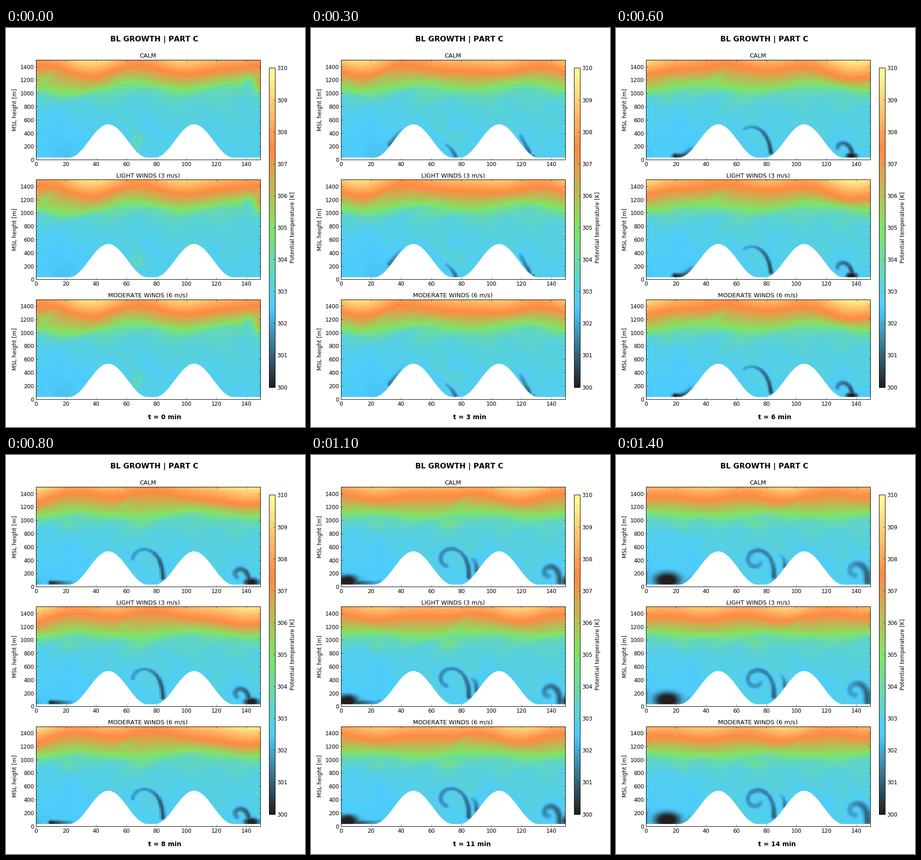
A matplotlib script that plays this animation: 648 px wide and 864 px high, repeating every 1500 ms.

```python
import numpy as np
import matplotlib.pyplot as plt
from matplotlib.animation import FuncAnimation
from matplotlib.colors import LinearSegmentedColormap

plt.rcParams.update({
    "figure.dpi": 72, "font.family": "DejaVu Sans", "font.size": 12,
    "text.kerning_factor": 6,
    "axes.linewidth": 1, "axes.axisbelow": False,
    "xtick.direction": "in", "ytick.direction": "in",
    "xtick.top": True, "ytick.right": True,
    "xtick.major.size": 4, "ytick.major.size": 4,
    "xtick.major.width": 0.5, "ytick.major.width": 0.5,
    "xtick.major.pad": 4, "ytick.major.pad": 4,
})

FRAMES, STEP_MS = 15, 100
WIDTH, TOP = 149, 1500
NX, NZ = 149, 100
Z_UNIT = 22  # metres of height drawn as long as one horizontal grid point

HEAT = LinearSegmentedColormap.from_list(
    "heat", ["#221f1f", "#4dccff", "#80e466", "#ff8a42", "#ffff99"], N=256)

X, Z = np.meshgrid((np.arange(NX) + 0.5) * WIDTH / NX,
                   (np.arange(NZ) + 0.5) * TOP / NZ)


def wrap(dx):
    """Shortest horizontal distance in the periodic domain."""
    return (dx + WIDTH / 2) % WIDTH - WIDTH / 2


def ramp(t, start, end):
    return np.clip((t - start) / (end - start), 0, 1)


def terrain(x):
    z = np.full_like(x, 35, dtype=float)
    for centre in (48, 105):
        d = np.clip((x - centre) / 26, -1, 1)
        z += 500 * np.cos(d * np.pi / 2) ** 2
    return z


def wave(x, count, degrees):
    return np.cos(2 * np.pi * count * x / WIDTH - np.radians(degrees))


def inversion(x, t):
    """Heights of the 305 K and 307.5 K surfaces: waves travelling along them."""
    green = (1085 + 66 * np.exp(-t / 14) * wave(x, 2, 300 - 20 * t)
             + 28 * np.exp(-t / 6) * wave(x, 1, 240))
    orange = (1340 + 62 * np.exp(-t / 15) * wave(x, 2, 340 - 30 * t)
              + (20 - 90 * np.sin(np.pi * t / 14) ** 2) * wave(x, 1, -28)
              + 28 * wave(x, 3, 110 + 53 * t))
    return green, orange


def eddies(t):
    """Faint folded streaks drifting with the flow."""
    rng = np.random.default_rng(4)
    wx = X - 1.5 * t + 5 * np.sin(Z / 140 + X / 21 + t * 0.15)
    wz = Z + 90 * np.sin(X / 9 - t * 0.2)
    total = 0
    for _ in range(6):
        kx, kz, phase = rng.uniform([.07, -.009, 0], [.32, .009, 6.3])
        total = total + np.sin(kx * wx + kz * wz + phase)
    return total / 6


def puff(x, z, rx, rz):
    return np.exp(-(wrap(X - x) / rx) ** 2 - ((Z - z) / rz) ** 2)


def cooling(x, z, strength, width):
    """Cooling around a polyline whose strength varies along its length."""
    best = np.zeros_like(X)
    for i in range(len(x) - 1):
        dx, dz = x[i + 1] - x[i], (z[i + 1] - z[i]) / Z_UNIT
        px, pz = wrap(X - x[i]), (Z - z[i]) / Z_UNIT
        f = np.clip((px * dx + pz * dz) / (dx * dx + dz * dz + 1e-9), 0, 1)
        dist2 = (px - f * dx) ** 2 + (pz - f * dz) ** 2
        level = strength[i] + f * (strength[i + 1] - strength[i])
        best = np.maximum(best, level * np.exp(-dist2 / width ** 2))
    return best


def roll(t, foot, length, turn, strength, width):
    """Cold plume rising from the ground and curling over to the left."""
    s = np.linspace(0, 1, 24)
    lean = 90 + 28 * np.exp(-max(t - 4, 0) / 2)
    heading = np.radians(lean + turn * s ** 2)
    step = length / len(s)
    x = foot + np.cumsum(np.cos(heading)) * step
    z = terrain(foot) + 10 + np.cumsum(np.sin(heading)) * step * Z_UNIT
    return cooling(x, z, strength * (1 - 0.5 * s), width)


def cold_air(t):
    late = max(t - 4, 0)
    onset = ramp(t, 0.5, 4)

    valley = roll(t, 85 - 5 * np.exp((4 - t) / 1.8),
                  52 * (1 - np.exp(-max(t - 2, 0.5) / 4.7)), 27 * max(t - 2, 0),
                  onset * 2.4 - 0.05 * late, 1.5 + 0.04 * late)
    right = roll(t, 149 - 18.5 * np.exp((4 - t) / 4.3),
                 15 + 1.4 * (t - 4), 260 * (1 - np.exp(-late / 2)),
                 onset * 2.5 - 0.06 * late, 1.5 + 0.12 * late)
    young = roll(t, 90 + 0.7 * (t - 11), 9, 60, 1.6 * ramp(t, 8, 11), 1.8)

    # Pool sliding right along the valley floor and in again on the left
    u = wrap(X - 130 - 3.3 * (t - 4)) / (0.6 * t + 0.5)
    v = (Z - 45 - 5 * late) / (35 + 9 * late)
    pool = 2.8 * ramp(t, 1, 4) * np.exp(-(u ** 2 + v ** 2) ** 1.5)

    # Thin layer draining down the left slope
    front = max(28 - 4.5 * (t - 4), 10)
    x = np.linspace(front, front + 9 + late, 9)
    drain = cooling(x, terrain(x) + 20, np.linspace(2.5, 0.6, 9)
                    * ramp(t, 2, 4) * (1 - 0.5 * ramp(t, 8, 14)), 1.6)
    return np.maximum.reduce([valley, right, young, pool, drain])


def field(t):
    wx = X + 2 * np.sin(Z / 75 + X / 17 - t * 0.5)
    green, orange = inversion(wx, t)
    top = 308.6 - 0.01 * (inversion(X, t)[1] - 1340)

    mixed = (302.62 + 0.45 * np.clip(Z / 1000, 0, 1) ** 1.5
             + 0.13 * np.tanh((X - 42) / 15) + 0.25 * eddies(t))
    depth = 85 + 25 * np.sin(X / 6 - Z / 70 - t * 0.4)
    below = mixed + (305 - mixed) * np.exp(-np.maximum(green - Z, 0) / depth)
    middle = 305 + 2.5 * (Z - green) / (orange - green)
    above = 307.5 + (top - 307.5) * (Z - orange) / np.maximum(TOP - orange, 40)
    theta = np.where(Z < green, below, np.where(Z < orange, middle, above))

    # Overshooting plume with warm air drawn down behind it
    theta -= 1.3 * np.exp(-t / 3) * puff(141 + 4.3 * t, 1140, 4, 110)
    theta += 1.5 * np.exp(-t) * puff(148 + 4.3 * t, 1090, 3, 110)
    # Warm tongues sinking below the inversion, and the warm valley eddy
    theta += 0.8 * ramp(t, 3, 8) * puff(25 - 11 * np.exp((6 - t) / 2), 920, 6, 90)
    theta += 0.7 * ramp(t, 6, 11) * puff(72, 950, 7, 65)
    theta += 0.8 * np.exp(-t / 7) * puff(67 + 20 * ramp(t, 0, 5), 270 + 30 * t, 4, 110)
    # Slanted mixing streak carried along the inversion
    slant = X - (9 + 6.5 * t) - (Z - 1250) / 22
    theta -= 0.6 * np.exp(-(slant / 4) ** 2 - ((Z - 1250) / 110) ** 2)
    return theta - cold_air(t)


fig, axes = plt.subplots(3, 1, figsize=(9, 12), facecolor="white")
fig.subplots_adjust(left=0.1, right=0.85, bottom=0.07, top=0.92, hspace=0.2)
ground = np.linspace(0, WIDTH, 600)
images = []
for ax, title in zip(axes, ["CALM", "LIGHT WINDS (3 m/s)", "MODERATE WINDS (6 m/s)"]):
    images.append(ax.imshow(field(0), cmap=HEAT, vmin=300, vmax=310, origin="lower",
                            extent=(0, WIDTH, 0, TOP), aspect="auto",
                            interpolation="nearest"))
    ax.fill_between(ground, 0, terrain(ground), color="white", lw=0, zorder=1)
    ax.set(xlim=(0, WIDTH), ylim=(0, TOP),
           xticks=range(0, 141, 20), yticks=range(0, 1401, 200))
    ax.set_title(title, fontsize=13, pad=5)
    ax.set_ylabel("MSL height [m]", labelpad=5)

bar = fig.colorbar(images[0], cax=fig.add_axes([0.88, 0.1, 0.02, 0.8]),
                   ticks=range(300, 311))
bar.ax.tick_params(left=False, right=True, direction="in", length=4, width=0.5)
bar.set_label("Potential temperature [K]", labelpad=5)

fig.text(0.348, 0.966, "BL GROWTH | PART C", fontsize=16, weight="bold")
clock = fig.text(0.475, 0.02, "", fontsize=14, weight="bold")


def update(minute):
    theta = field(minute)
    for image in images:
        image.set_data(theta)
    clock.set_text(f"t = {minute} min")
    return [*images, clock]


anim = FuncAnimation(fig, update, frames=FRAMES, interval=STEP_MS,
                     repeat=True, repeat_delay=0, blit=False)
plt.show()
```
